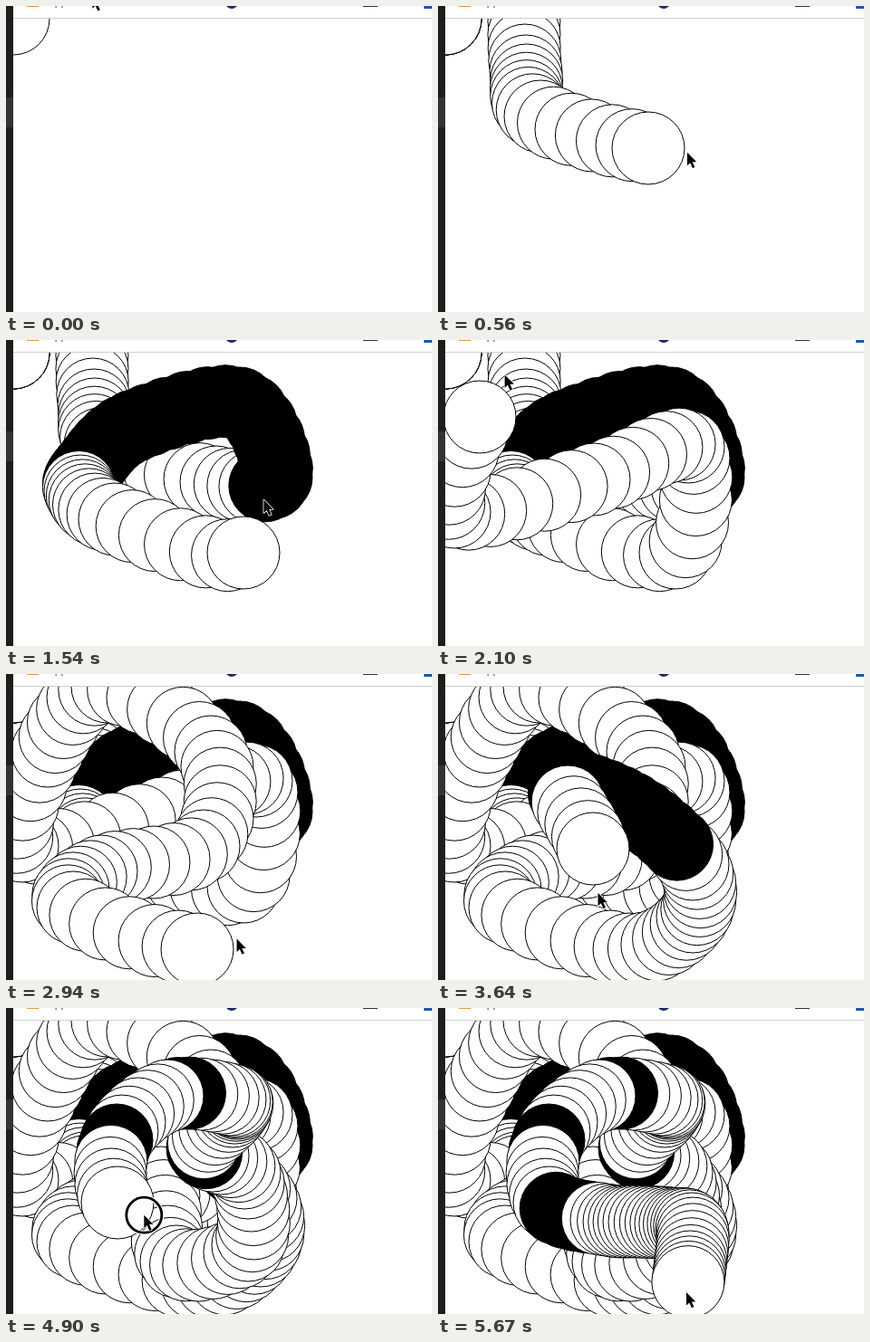
Animation, 470 px wide and 338 px high, one loop 5.74 s. Source, as an HTML page with a canvas:

```html
<!DOCTYPE html>
<html lang="en">
<head>
<meta charset="utf-8">
<title>Mouse trail</title>
<style>
  html, body { margin: 0; width: 100%; height: 100%; overflow: hidden; background: #fff; }
  canvas { display: block; width: 470px; height: 338px; }
</style>
</head>
<body>
<canvas id="stage" width="470" height="338"></canvas>
<script>
const ctx = document.getElementById('stage').getContext('2d');
const STEP = 70, STEPS = 82, PER_STEP = 3, KEY_GAP = 2;
const ORIGIN = [8, 14], RADIUS = 40, ENTER = 2.5, LEAD = 1;

// Pointer positions, evenly spaced in time
const keys = [
  [96, -10], [95, -4], [97, 72], [113, 122], [232, 157], [298, 152], [258, 70],
  [141, 95], [92, 140], [82, 167], [120, 198], [262, 235], [276, 118], [172, 154],
  [18, 190], [46, 85], [112, 14], [226, 86], [218, 190], [105, 218], [74, 258],
  [211, 304], [281, 268], [281, 210], [213, 148], [140, 126], [171, 193], [188, 280],
  [267, 262], [263, 182], [217, 155], [250, 114], [247, 101], [178, 97], [122, 146],
  [123, 215], [186, 234], [222, 236], [257, 238], [280, 244], [278, 286], [274, 314]
];
// Steps during which the button is held
const presses = [[9.1, 17.5], [46.6, 50.4], [59.4, 60.3], [65.2, 65.8], [67.9, 68.5], [70.1, 71.4]];

const pressed = t => presses.some(([a, b]) => t >= a && t <= b);
const key = i => keys[Math.max(0, Math.min(keys.length - 1, i))];

// Catmull-Rom spline through the keys
function pointer(t) {
  const i = Math.floor(t / KEY_GAP), s = t / KEY_GAP - i;
  const [p, a, b, n] = [-1, 0, 1, 2].map(d => key(i + d));
  return [0, 1].map(k => a[k] + 0.5 * s * (b[k] - p[k] +
    s * (2 * p[k] - 5 * a[k] + 4 * b[k] - n[k] +
    s * (3 * (a[k] - b[k]) + n[k] - p[k]))));
}

function disc(x, y, r, fill, stroke, width = 1) {
  ctx.beginPath();
  ctx.arc(x, y, r, 0, Math.PI * 2);
  if (fill) { ctx.fillStyle = fill; ctx.fill(); }
  if (stroke) { ctx.strokeStyle = stroke; ctx.lineWidth = width; ctx.stroke(); }
}

function box(x, y, w, h, color) {
  ctx.fillStyle = color;
  ctx.fillRect(x, y, w, h);
}

function drawWindow() {
  box(0, 0, 470, 338, '#fff');
  box(8, 13, 462, 1, '#cfcfcf');
  box(0, 0, 8, 338, '#1e1e1e');
  box(0, 101, 8, 33, '#333335');
  box(23, -9, 13, 10, '#d9a03c');
  ctx.fillStyle = '#555';
  ctx.font = '12px Roboto, sans-serif';
  ctx.fillText('Apps', 46, -1);
  disc(249, -4, 7, '#1c2a5e');
  box(394, 0, 16, 1, '#333');
  box(461, -8, 9, 11, '#2456a8');
}

function drawTrail(step) {
  ctx.save();
  ctx.beginPath();
  ctx.rect(8, 14, 462, 324);
  ctx.clip();
  for (let i = 0; i <= step * PER_STEP; i++) {
    const t = i / PER_STEP;
    const [x, y] = t < ENTER ? ORIGIN : pointer(t);
    disc(x, y, RADIUS, pressed(t) ? '#000' : '#fff', '#000');
  }
  ctx.restore();
}

const arrow = new Path2D('M0 0V14.5L3.3 11.4 5.9 17.2 8.4 16.1 5.8 10.4H10.3Z');

function drawPointer(t) {
  const [x, y] = pointer(t);
  if (pressed(t)) {
    disc(x, y, 19.5, null, '#fff', 5);
    disc(x, y, 19.5, null, '#000', 2.8);
  }
  ctx.save();
  ctx.translate(x, y);
  ctx.lineJoin = 'round';
  ctx.strokeStyle = '#fff';
  ctx.lineWidth = 1.6;
  ctx.stroke(arrow);
  ctx.fillStyle = '#000';
  ctx.fill(arrow);
  ctx.restore();
}

let shown = -1;
const start = performance.now();

function tick() {
  const step = Math.floor((performance.now() - start) / STEP) % STEPS;
  if (step !== shown) {
    shown = step;
    drawWindow();
    drawTrail(step);
    drawPointer(step + LEAD);
  }
  requestAnimationFrame(tick);
}
tick();
</script>
</body>
</html>
```
